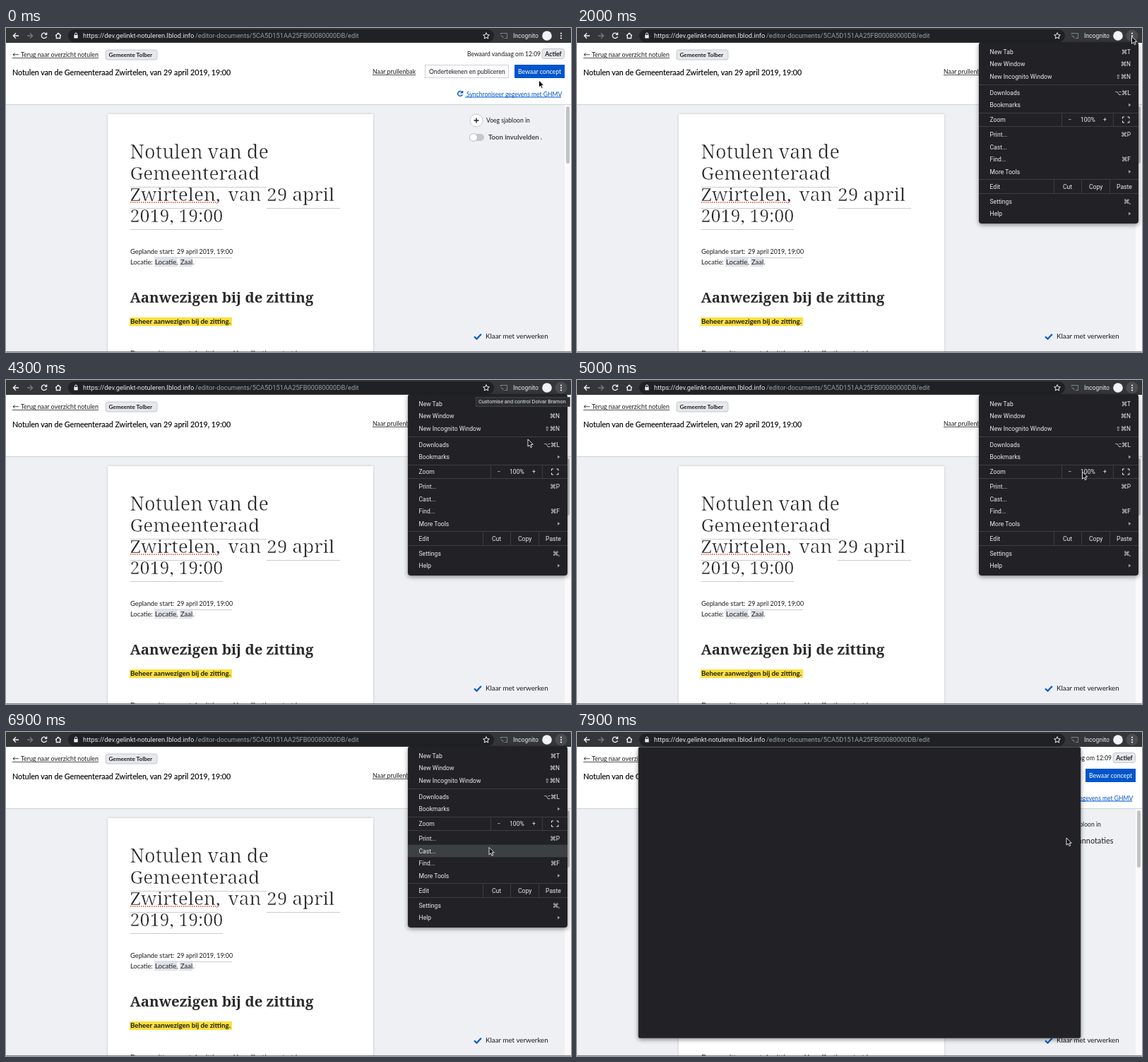
Animation of 800x459 px, one loop 8 s. Source, as an HTML page:

```html
<!DOCTYPE html>
<html lang="nl">
<head>
<meta charset="utf-8">
<title>Notulen</title>
<style>
html, body { margin: 0; width: 100%; height: 100%; overflow: hidden; background: #eff0f3; }
svg { display: block; width: 800px; height: 459px; }
text { font-family: Lato, "Open Sans", sans-serif; fill: #1c1c1c; white-space: pre; }
.ui text { font-family: Roboto, "Liberation Sans", sans-serif; fill: #e8eaed; font-size: 8.6px; }
.ui .keys { font-family: Roboto, "DejaVu Sans", sans-serif; text-anchor: end; }
.ui .dim { fill: #9aa0a6; }
.title text { font-family: "Noto Serif", serif; font-weight: 300; font-size: 26.3px; fill: #222; stroke: #fff; stroke-width: .6; }
.head { font-family: "Noto Serif", serif; font-weight: 700; fill: #2b2b2b; }
.b { font-weight: 700; }
.dark { fill: #000; stroke: #000; stroke-width: .15; }
.white { fill: #fff; }
.link { fill: #0055cc; }
.icon { fill: none; stroke: #f1f3f4; stroke-width: 1.3; }
.thin { stroke-width: 1; }
</style>
</head>
<body>
<svg id="stage" viewBox="0 0 800 459" xmlns="http://www.w3.org/2000/svg">
  <defs>
    <filter id="soft" x="-10%" y="-10%" width="120%" height="125%">
      <feDropShadow dx="0" dy="2" stdDeviation="3" flood-opacity=".45"/>
    </filter>
    <filter id="paper" x="-5%" y="-5%" width="110%" height="110%">
      <feDropShadow dx="0" dy="0" stdDeviation="1.5" flood-opacity=".2"/>
    </filter>
  </defs>
  <rect width="800" height="459" fill="#eff0f3"/>
  <g id="page"></g>
  <g id="bar" class="ui"></g>
  <g id="menu" class="ui" filter="url(#soft)"></g>
  <g id="tip" class="ui"></g>
  <g id="popup" filter="url(#soft)">
    <rect x="87" y="21.5" width="626" height="412" rx="2" fill="#212326" stroke="#3c3d40" stroke-width=".6"/>
  </g>
  <path d="M0 458.5H800" stroke="#555" stroke-opacity=".7"/>
  <path id="cursor" d="M0 0V10.2L2.4 8L4 11.6L5.7 10.8L4.1 7.3H7.2Z" fill="#000" stroke="#fff" stroke-width=".9"/>
</svg>
<script>
const $ = id => document.getElementById(id);
const text = (x, y, str, size, cls = '') =>
  `<text x="${x}" y="${y}" class="${cls}" ${size ? `style="font-size:${size}px"` : ''}>${str}</text>`;
const rect = (x, y, w, h, fill, attrs = '') =>
  `<rect x="${x}" y="${y}" width="${w}" height="${h}" fill="${fill}" ${attrs}/>`;
const path = (d, attrs = '') => `<path d="${d}" ${attrs}/>`;
const line = (x1, x2, y, color) => path(`M${x1} ${y}H${x2}`, `stroke="${color}" stroke-width="1"`);

const blue = '#0055cc';
const place = 'Zwirtelen';

function drawPage() {
  const badge = (x, y, w) => rect(x, y, w, 14, '#e6e8ec', 'rx="3" stroke="#c3c7ce"');
  const rule = '#c9cbd0';
  const header = [
    rect(0, 21, 800, 87, '#fff'),
    line(0, 800, 108.5, '#cfd2d8'),
    text(9, 41, '←', 9.5),
    text(21, 41, 'Terug naar overzicht notulen', 8.8),
    line(9, 131, 42.5, '#555'),
    badge(141, 31, 73),
    text(145.5, 41.3, 'Gemeente Tolber', 8.1, 'b'),
    text(9, 67, `Notulen van de Gemeenteraad ${place}, van 29 april 2019, 19:00`, 10.65, 'dark'),
    text(653, 40, 'Bewaard vandaag om 12:09', 8.55),
    badge(759, 29.5, 31.5),
    text(763.3, 39.5, 'Actief', 8.7, 'b'),
    text(519, 65, 'Naar prullenbak', 8.8),
    line(519, 580, 66.5, '#555'),
    rect(593.5, 52.5, 118, 18, '#fff', 'stroke="#cbd0d7"'),
    text(599, 64.5, 'Ondertekenen en publiceren', 8.6),
    rect(720, 52, 71, 19, blue),
    text(725, 64.7, 'Bewaar concept', 8.7, 'white'),
    path('M646 91.2A3.4 3.4 0 1 0 646.2 94.3M646.6 89V91.8H643.8',
      `fill="none" stroke="${blue}" stroke-width="1.4"`),
    text(652, 96.5, 'Synchroniseer gegevens met GHMV', 8.55, 'link'),
    line(650, 786, 98, blue)
  ];

  const sheet = [
    rect(144, 122, 376, 345, '#fff', 'filter="url(#paper)"'),
    '<g class="title">',
    text(175.5, 185, 'Notulen van de', 27),
    text(175.5, 215, 'Gemeenteraad'),
    text(175.5, 245, place + ','),
    text(314.5, 245, 'van'),
    text(369, 245, '29 april'),
    text(175.5, 275, '2019, 19:00', 25),
    '</g>',
    line(176, 369, 225.5, rule),
    line(176, 301, 255.5, rule),
    line(369, 473, 255.5, rule),
    line(176, 307, 285.5, rule),
    path('M176 247H300', 'stroke="#e0403a" stroke-width="1.5" stroke-dasharray="1.5 1.5"'),
    text(176, 319.5, 'Geplande start:', 9.3),
    text(242, 319.5, '29 april 2019, 19:00', 8.85),
    line(242, 320, 325.5, rule),
    rect(210, 324, 32, 14, '#dfe1e8'),
    rect(246, 324, 18, 14, '#dfe1e8'),
    text(176, 334.5, 'Locatie:', 9.3),
    text(211, 334.5, 'Locatie,', 9.6),
    text(247, 334.5, 'Zaal.', 9.4),
    text(175.5, 389, 'Aanwezigen bij de zitting', 20.4, 'head'),
    rect(175, 410, 145, 12, '#fbe03c'),
    text(176, 419, 'Beheer aanwezigen bij de zitting.', 9.75, 'b'),
    text(176, 464, 'De voorzitter opent de zitting op Uur effectieve start in', 10.05)
  ];

  const side = [
    rect(791, 109, 9, 350, '#fafafa'),
    rect(793, 111, 5, 81, '#c1c2c4', 'rx="2.5"'),
    '<circle cx="666" cy="131" r="9" fill="#fff" stroke="#c6cad1"/>',
    path('M662.5 131H669.5M666 127.5V134.5', 'stroke="#222" stroke-width="1.4"'),
    text(680, 134, 'Voeg sjabloon in', 8.6),
    rect(656, 150, 21, 10, '#c4c8ce', 'rx="5"'),
    '<circle cx="662" cy="155" r="5.5" fill="#fff" stroke="#b8bdc5"/>',
    '<g id="fields" opacity=".8">' + text(683, 158, 'Toon invulvelden .', 9.5, 'b') + '</g>',
    '<g id="notes">' + text(683, 158, 'Toon annotaties', 10.9) + '</g>',
    path('M663 437.3L666.5 440.5L672.8 433.8', `fill="none" stroke="${blue}" stroke-width="2.2"`),
    text(679, 440, 'Klaar met verwerken', 9.8)
  ];
  $('page').innerHTML = [...header, ...sheet, ...side].join('');
}

function drawBar() {
  const arrow = 'M18 11H10.5M14 7.3L10.3 11L14 14.7';
  const dots = [7.6, 11, 14.4].map(y => `<circle cx="786" cy="${y}" r="1.1" fill="#f1f3f4"/>`);
  $('bar').innerHTML = [
    rect(0, 0, 800, 21, '#35363a'),
    rect(88, 2, 603, 18, '#202124', 'rx="9"'),
    path(arrow, 'class="icon"'),
    path(arrow, 'class="icon" transform="translate(48 0) scale(-1 1)" opacity=".35"'),
    path('M57 8.6A3.7 3.7 0 1 0 57.5 12M57.6 6.6V9.4H54.8', 'class="icon"'),
    path('M70 11L74 7.2L78 11M71.3 10.5V14.5H76.7V10.5', 'class="icon"'),
    rect(96.3, 10, 5.4, 4.6, '#e8eaed', 'rx=".6"'),
    path('M97.4 10V8.6A1.6 1.6 0 0 1 100.6 8.6V10', 'class="icon thin"'),
    text(109, 14.2, 'https://dev.gelinkt-notuleren.lblod.info', 9.33),
    text(268, 14.2, '/editor-documents/5CA5D151AA25FB00080000DB/edit', 9.3, 'dim'),
    path('M680 6.6L681.3 9.6L684.4 9.9L682 12L682.7 15L680 13.4L677.3 15L678 12L675.6 9.9L678.7 9.6Z',
      'class="icon thin"'),
    path('M700.5 9V7.5H709.5V14.5H706M700.5 11A3.5 3.5 0 0 1 704 14.5', 'class="icon thin" opacity=".4"'),
    text(718, 14, 'Incognito', 8.65),
    '<circle cx="766" cy="11" r="6.8" fill="#f1f3f4"/>',
    '<circle id="halo" cx="786" cy="11" r="8.5" fill="#4b4c50"/>',
    ...dots
  ].join('');
}

// label, row centre, shortcut
const rows = [
  ['New Tab', 33.5, '⌘T'], ['New Window', 51, '⌘N'], ['New Incognito Window', 68.5, '⇧⌘N'],
  ['Downloads', 91.5, '⌥⌘L'], ['Bookmarks', 109, '>'], ['Zoom', 130, ''],
  ['Print...', 151, '⌘P'], ['Cast...', 168.5, ''], ['Find...', 186, '⌘F'],
  ['More Tools', 203.5, '>'], ['Edit', 224.5, ''], ['Settings', 245.5, '⌘,'], ['Help', 263, '>']
];
const plainRows = rows.filter(([name]) => name !== 'Zoom' && name !== 'Edit');

function drawMenu() {
  const sep = '#3d3e42';
  const out = [
    rect(569, 20, 226, 257, '#222326', 'rx="4"'),
    rect(569, 0, 226, 17.5, '#3e3f43', 'id="hover"')
  ];
  for (const y of [80.5, 120.5, 139.5, 214.5, 234.5]) out.push(line(569, 795, y, sep));
  for (const x of [686.5, 759.5]) out.push(path(`M${x} 121V139`, `stroke="${sep}"`));
  for (const x of [675.5, 714.5, 754.5]) out.push(path(`M${x} 215V234`, `stroke="${sep}"`));
  for (const [name, y, key] of rows) {
    out.push(text(584.5, y + 3, name));
    if (key === '>') out.push(path(`M781 ${y - 2.3}L784.5 ${y}L781 ${y + 2.3}Z`, 'fill="#9aa0a6"'));
    else if (key) out.push(text(784, y + 3, key, 8.4, 'keys'));
  }
  out.push(
    text(695.5, 133, '−'), text(713, 133, '100%'), text(745, 133, '+'),
    path('M772.5 128.5V126H775M779.5 126H782V128.5M782 131.5V134H779.5M775 134H772.5V131.5',
      'class="icon thin"'),
    text(688, 227.5, 'Cut'), text(725, 227.5, 'Copy'), text(764, 227.5, 'Paste')
  );
  $('menu').innerHTML = out.join('');
}

function drawTip() {
  $('tip').innerHTML = rect(665.5, 24.5, 133, 13, '#2d2e31', 'stroke="#4a4b4f" stroke-width=".7"') +
    text(669, 33.4, 'Customise and control Dolvar Bramon', 7.35);
}

// time, x, y of the pointer tip
const track = [
  [0, 754.5, 74], [200, 755, 72], [800, 785.5, 12], [3700, 785.5, 12], [4200, 739, 84],
  [4600, 739, 84], [5400, 692, 176], [5800, 688, 180], [6400, 687, 179], [6900, 684, 163.5],
  [7200, 690, 67], [7500, 690, 67], [7900, 693, 150]
];

function pointerAt(t) {
  const i = track.findIndex(k => k[0] > t);
  if (i < 0) return track[track.length - 1].slice(1);
  const [t0, x0, y0] = track[i - 1], [t1, x1, y1] = track[i];
  const p = (t - t0) / (t1 - t0), e = p * p * (3 - 2 * p);
  return [x0 + (x1 - x0) * e, y0 + (y1 - y0) * e];
}

const show = (id, on) => $(id).setAttribute('visibility', on ? 'visible' : 'hidden');

function render(t) {
  const [x, y] = pointerAt(t);
  const open = t >= 1100 && t < 7600;
  const row = open && t >= 4500 && plainRows.find(r => Math.abs(r[1] - y) < 8.75);
  show('halo', t >= 800);
  show('menu', open);
  show('hover', row);
  if (row) $('hover').setAttribute('y', row[1] - 8.75);
  show('tip', t >= 3000 && t < 4800);
  show('popup', t >= 7900);
  show('fields', t < 7900);
  show('notes', t >= 7900);
  show('cursor', t < 7600 || t >= 7900);
  $('cursor').setAttribute('transform', `translate(${x} ${y})`);
}

drawPage();
drawBar();
drawMenu();
drawTip();
const start = performance.now();
function tick() {
  const t = (performance.now() - start) % 8000;
  render(Math.floor(t / 100) * 100);
  requestAnimationFrame(tick);
}
render(0);
requestAnimationFrame(tick);
</script>
</body>
</html>
```
